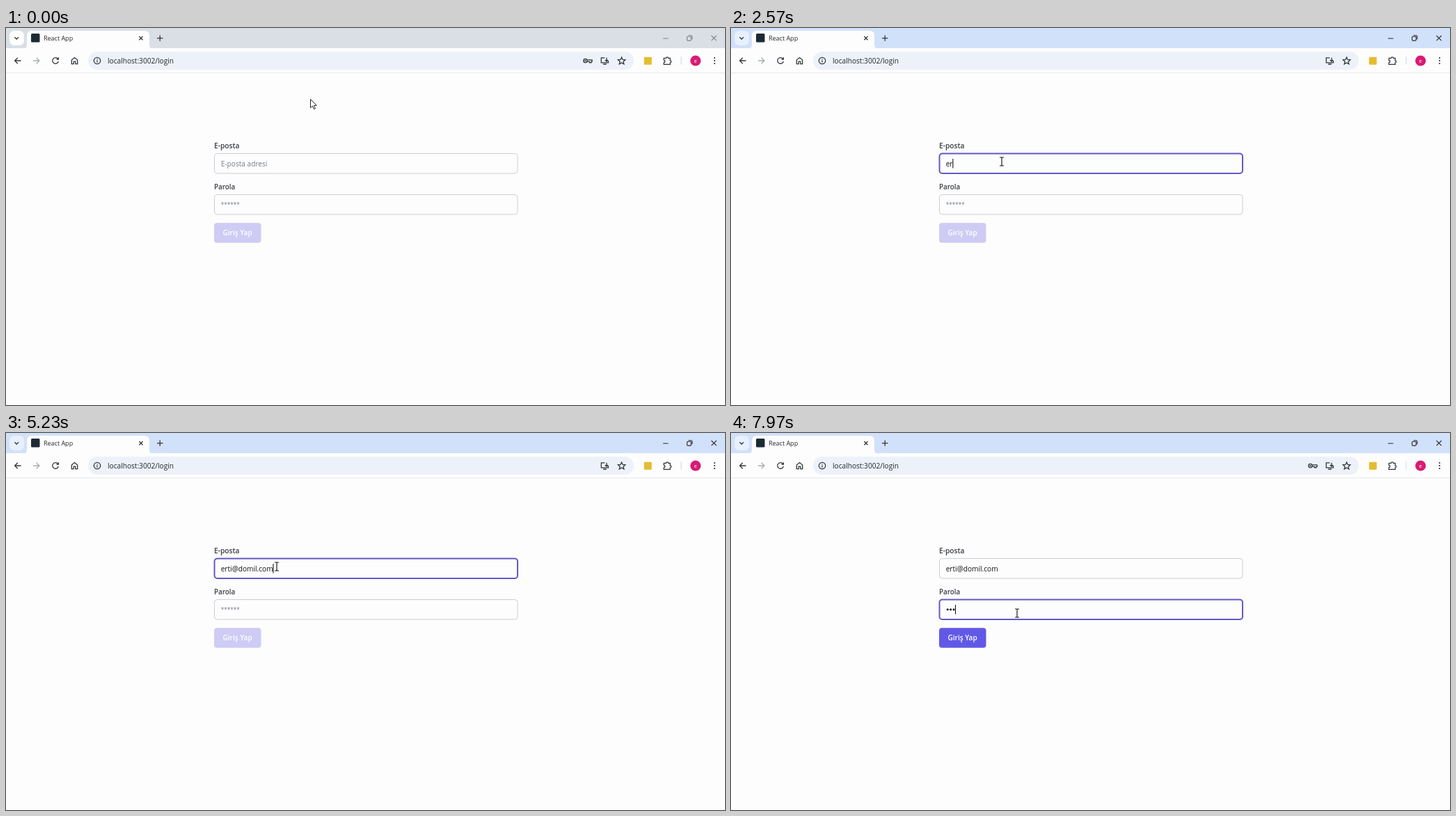
Write an HTML page that moves like this. It is 1033 px wide and 542 px high and loops after 8 s.

```html
<!DOCTYPE html>
<html lang="tr">
<head>
<meta charset="utf-8">
<title>React App</title>
<style>
  html, body { margin: 0; width: 100%; height: 100%; overflow: hidden; background: #fdfdfd; }
  svg { display: block; width: 1033px; height: 542px; }
  text { font-family: "Open Sans", "Noto Sans", sans-serif; font-size: 10.15px; fill: #24272c; }
  .label { font-weight: 600; fill: #3a3d44; }
  .hint { fill: #747b87; }
  .typed { fill: #111; }
  .line { fill: none; stroke: #33373b; stroke-width: 1.3; }
  .field { fill: #fdfdfd; stroke: #cbced5; stroke-width: 1; }
  .field.focus { stroke: #6259c4; stroke-width: 2; }
  #strip { fill: #d9dfe5; }
  #menu { fill: #fff; }
  #win { fill: none; stroke: #7c8288; stroke-width: 1.1; }
  #button { fill: #cecbf5; }
  .active #strip { fill: #d2e1fa; }
  .active #menu { fill: #e8f0fd; }
  .active #win { stroke: #25282c; }
  .ready #button { fill: #6159e6; }
</style>
</head>
<body>
<svg id="stage" viewBox="0 0 1033 542">
  <rect width="1033" height="542" fill="#fdfdfd"/>

  <!-- tab strip -->
  <rect id="strip" width="1033" height="30"/>
  <rect id="menu" x="5" y="4" width="21" height="21" rx="7"/>
  <path class="line" d="M12.4 13.2l2.8 2.8 2.8-2.8"/>
  <path d="M24 30q6 0 6-6V11q0-7 7-7h162q7 0 7 7v13q0 6 6 6z" fill="#fdfdfd"/>
  <rect x="36" y="8" width="12.5" height="12.5" rx="1.5" fill="#1c2b33"/>
  <text x="54" y="18.3" style="font-size:9px">React App</text>
  <path class="line" d="M191.3 12l5.2 5.2m0-5.2l-5.2 5.2M217 14.6h8.4m-4.2-4.2v8.4"/>
  <g id="win">
    <path d="M944 15h7.5M1013.5 11l7.2 7.2m0-7.2l-7.2 7.2"/>
    <rect x="978.5" y="12.3" width="5.8" height="5.8" rx="1.2"/>
    <path d="M980.5 10.8h3.6q1.8 0 1.8 1.8v3.6"/>
  </g>

  <!-- toolbar -->
  <rect y="29" width="1033" height="35" fill="#fdfdfd"/>
  <path d="M0 64.5h1033" stroke="#e7e8ea"/>
  <rect x="118" y="34" width="784" height="26" rx="13" fill="#edf2fa"/>
  <g class="line">
    <path d="M21.5 47h-8.7m4-4.2L12.6 47l4.2 4.2"/>
    <path d="M39 47h8.7m-4-4.2l4.2 4.2-4.2 4.2" stroke="#a5b0a7"/>
    <path d="M74.6 44.4a4.3 4.3 0 1 0 .7 3.6m.1-5.7v2.9h-2.9"/>
    <path d="M94.3 51.6v-5.5l4.2-3.5 4.2 3.5v5.5h-2.9v-3.5h-2.6v3.5z"/>
    <circle cx="131" cy="47" r="4.7"/>
    <path d="M131 46.4v3m0-5v1.1"/>
    <path d="M860.2 42.8h-5v7h10.2v-2.6m-7.5 4.8h4.8m.2-9.2v5.2m-2.2-2l2.2 2.2 2.2-2.2"/>
    <path d="M884.5 42l1.5 3.4 3.7.3-2.8 2.5.9 3.6-3.3-1.9-3.3 1.9.9-3.6-2.8-2.5 3.7-.3z"/>
    <path d="M945.2 43.4h3.2a1.6 1.6 0 0 1 3.2 0h2.6v3.4a1.5 1.5 0 0 1 0 3v2.6h-9v-2.8a1.6 1.6 0 0 0 0-3.2z"/>
  </g>
  <g id="key" class="line">
    <circle cx="832.4" cy="47" r="2.7"/>
    <circle cx="832.4" cy="47" r=".5"/>
    <path d="M835.2 45.9h6.8v2.4h-1.2v1.5h-2.4v-1.5h-3.2"/>
  </g>
  <text x="146" y="50.7">localhost:3002/login</text>
  <rect x="916.7" y="41.7" width="11" height="11" rx="1" fill="#e3bd31"/>
  <path d="M970 41.5v11" stroke="#c5d3ea"/>
  <circle cx="990.7" cy="47" r="7.6" fill="#d81b73"/>
  <text x="990.7" y="49.5" text-anchor="middle" style="font-size:7.5px;fill:#fff">e</text>
  <g fill="#33373b">
    <circle cx="1018" cy="43" r="1.1"/><circle cx="1018" cy="47" r="1.1"/><circle cx="1018" cy="51" r="1.1"/>
  </g>

  <!-- login form -->
  <text class="label" x="299" y="173.4" style="font-size:10.2px">E-posta</text>
  <rect id="mail" class="field" x="299.5" y="180.5" width="435.5" height="28.5" rx="4"/>
  <text id="mailHint" class="hint" x="308.7" y="198.5">E-posta adresi</text>
  <text id="mailText" class="typed" x="308.7" y="198.5"></text>
  <text class="label" x="299" y="232.4" style="font-size:9.8px">Parola</text>
  <rect id="pass" class="field" x="299.5" y="239.5" width="435.5" height="28.5" rx="4"/>
  <text id="passHint" class="hint" x="308.8" y="256.8" style="font-size:8.1px">******</text>
  <g id="dots" fill="#111"></g>
  <rect id="button" x="299" y="280.3" width="67.5" height="28.5" rx="4"/>
  <text class="label" x="332.6" y="298.4" text-anchor="middle" style="fill:#fff;font-size:10px">Giriş Yap</text>
  <path id="caret" d="M0 0v13.5" stroke="#111" stroke-width="1.1"/>

  <!-- pointers -->
  <path id="arrow" d="M.5.5v12.3l2.9-2.7 2 4.6 2-.9-2-4.5h3.8z" fill="#fff" stroke="#222" stroke-width="1"/>
  <g id="beam" fill="none">
    <path d="M-3-6h2.2l.8.7.8-.7H3M-3 6h2.2l.8-.7.8.7H3M0-5.5v11" stroke="#fff" stroke-width="2.6"/>
    <path d="M-3-6h2.2l.8.7.8-.7H3M-3 6h2.2l.8-.7.8.7H3M0-5.5v11" stroke="#1a1a1a" stroke-width="1.2"/>
  </g>
</svg>
<script>
const LOOP = 8000, BLINK = 530;
const MAIL = 'erti@domil.com';
const MAIL_FOCUS = 1100, PASS_FOCUS = 6720;
const MAIL_KEYS = [2300, 2480, 2680, 2880, 3180, 3420, 3700, 3930, 4150, 4370, 4650, 4850, 5030, 5200];
const PASS_KEYS = [7350, 7600, 7850];
// time, x, y of the pointer
const PATH = [
  [0, 437, 102], [200, 437, 102], [760, 387, 192.5], [900, 387, 192.5],
  [1060, 389, 192], [6050, 389, 192], [6620, 411, 259], [LOOP, 411, 259]
];

const $ = id => document.getElementById(id);
const show = (id, on) => $(id).setAttribute('visibility', on ? 'visible' : 'hidden');
const place = (id, x, y) => $(id).setAttribute('transform', `translate(${x} ${y})`);
const count = (keys, t) => keys.filter(k => k <= t).length;
const ease = p => p * p * (3 - 2 * p);

$('dots').innerHTML = PASS_KEYS.map((_, i) =>
  `<circle cx="${311.2 + i * 4.4}" cy="253.7" r="1.55"/>`).join('');

function pointerAt(t) {
  const i = PATH.findIndex(p => p[0] > t);
  const [t0, x0, y0] = PATH[i - 1], [t1, x1, y1] = PATH[i];
  const p = ease((t - t0) / (t1 - t0));
  return [x0 + (x1 - x0) * p, y0 + (y1 - y0) * p];
}

function draw(t) {
  const mailCount = count(MAIL_KEYS, t), passCount = count(PASS_KEYS, t);
  const inMail = t >= MAIL_FOCUS && t < PASS_FOCUS, inPass = t >= PASS_FOCUS;

  $('stage').classList.toggle('active', t >= MAIL_FOCUS);
  $('stage').classList.toggle('ready', passCount > 0);
  $('mail').classList.toggle('focus', inMail);
  $('pass').classList.toggle('focus', inPass);
  show('key', mailCount === 0 || passCount > 0);

  $('mailText').textContent = MAIL.slice(0, mailCount);
  show('mailHint', mailCount === 0);
  show('passHint', passCount === 0);
  [...$('dots').children].forEach((dot, i) =>
    dot.setAttribute('visibility', i < passCount ? 'visible' : 'hidden'));

  // the caret restarts its blink on focus and on every key
  const since = Math.max(...[MAIL_FOCUS, PASS_FOCUS, ...MAIL_KEYS, ...PASS_KEYS].filter(k => k <= t));
  show('caret', (inMail || inPass) && (t - since) % (2 * BLINK) < BLINK);
  if (inPass) place('caret', 309.3 + passCount * 4.4, 247);
  else place('caret', 309 + (mailCount ? $('mailText').getComputedTextLength() : 0), 188);

  const [x, y] = pointerAt(t);
  const overField = (y >= 180 && y <= 209) || (y >= 239 && y <= 268);
  show('arrow', !overField);
  show('beam', overField);
  place(overField ? 'beam' : 'arrow', x, y);
}

const start = performance.now();
function tick() {
  draw((performance.now() - start) % LOOP);
  requestAnimationFrame(tick);
}
tick();
</script>
</body>
</html>
```
